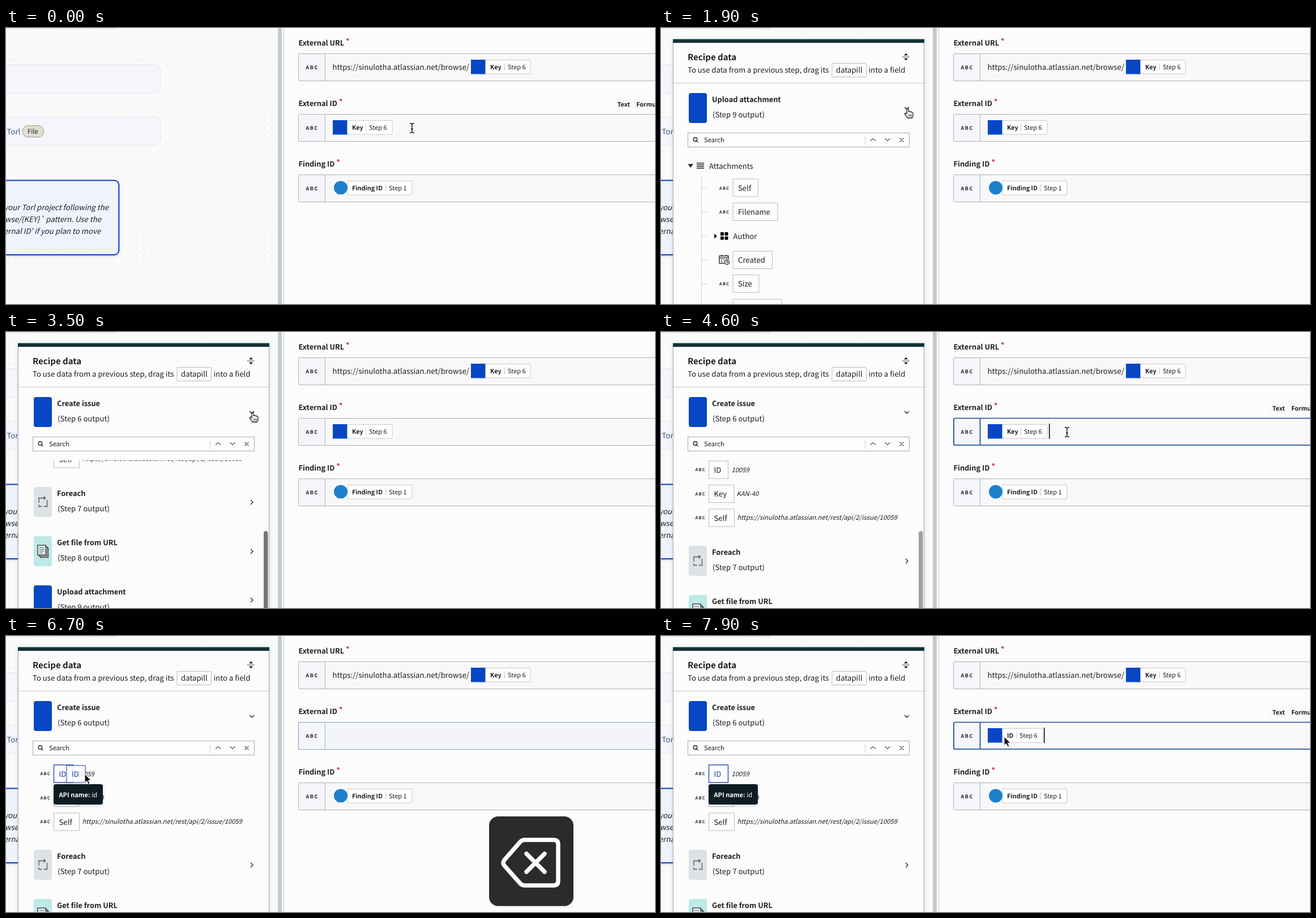
Recreate the animation shown at these times as an HTML page. Size 1146x488 px, loop 8000 ms.

```html
<!DOCTYPE html>
<html lang="en">
<head>
<meta charset="utf-8">
<title>Recipe data</title>
<style>
  html, body { margin: 0; width: 100%; height: 100%; overflow: hidden; background: #fcfcfc; }
  svg { display: block; width: 1146px; height: 488px; }
  text { font: 13.18px "Noto Sans CJK SC", "Noto Sans CJK JP", "Noto Sans", sans-serif; fill: #1e1e1e;
    text-rendering: geometricPrecision; white-space: pre; }
  .b { font-weight: 700; font-size: 12.8px; }
  .h { font-weight: 700; font-size: 15px; }
  .s { font-size: 10.95px; }
  .sb { font-weight: 700; font-size: 10.8px; }
  .m { font-size: 11.25px; }
  .mb { font-weight: 700; font-size: 11.1px; }
  .it { font-style: italic; font-size: 11.3px; }
  .note { font-style: italic; text-anchor: end; }
  .abc { font-weight: 700; font-size: 8.8px; letter-spacing: 1.7px; }
  .tiny { font-weight: 700; font-size: 7.4px; letter-spacing: 1.2px; }
  .line { fill: none; stroke: #2a2a2a; stroke-width: 1.4; }
  .thin { fill: none; stroke: #4a4f52; stroke-width: 1.1; }
  .box { fill: #fdfdfd; stroke: #b4bdc3; }
  .blue { fill: #1540b0; }
</style>
</head>
<body>
<svg id="stage" viewBox="0 0 1146 488" xmlns="http://www.w3.org/2000/svg"></svg>
<script>
const LOOP = 8000, FRAME = 100;
const BRAND = '#0747c4', RING = '#1c4a8c', DISC = '#1c7fcd';
const SITE = 'https://sinulotha.atlassian.net';

// Drawing helpers
const text = (x, y, s, cls = '') => `<text x="${x}" y="${y}" class="${cls}">${s}</text>`;
const rect = (x, y, w, h, attrs = '') => `<rect x="${x}" y="${y}" width="${w}" height="${h}" ${attrs}/>`;
const path = (d, attrs = 'class="line"') => `<path d="${d}" ${attrs}/>`;
const group = (id, body, attrs = '') => `<g id="${id}" ${attrs}>${body}</g>`;
const at = (x, y, body) => `<g transform="translate(${x} ${y})">${body}</g>`;

const chevron = (x, y, turn = 0, id = '') =>
  at(x, y, `<g transform="rotate(${turn})"><path ${id && `id="${id}"`} d="M-2 -4L2 0L-2 4" class="line"/></g>`);

const caret = (id, x) => rect(x, 162, 1.6, 27, `id="${id}" fill="#111"`);

function chip(x, y, name, bar, step, width, disc, edge = '#c3cbd1', ink = '#1e1e1e') {
  const mark = disc
    ? `<circle cx="14" cy="12.5" r="12" fill="${DISC}"/>`
    : rect(0, 0, 25.5, 25.5, `fill="${BRAND}"`);
  const frame = rect(disc ? 26 : 20, .5, width - (disc ? 26 : 20), 24.5, `rx="2" fill="#fff" stroke="${edge}"`);
  return at(x, y, frame + mark +
    `<g style="--ink:${ink}">` + text(34, 17, name, 'sb') +
    path(`M${bar} 6V19`, 'stroke="#bcc5cb"') + text(bar + 5.5, 17, step, 's') + '</g>');
}

const field = (y, label, star) =>
  text(516.5, y - 14, label, 'b') +
  `<text x="${star}" y="${y - 17.5}" class="b" style="fill:#c0352b">*</text>` +
  rect(516.5, y + .5, 640, 48, 'rx="2" fill="#f8f8f8"') +
  rect(516.5, y + .5, 47, 48, 'fill="#f4f6fb"') +
  rect(516.5, y + .5, 640, 48, 'rx="2" fill="none" stroke="#a5b2b9"') +
  path(`M563.5 ${y}v49`, 'stroke="#a5b2b9"') +
  text(529.5, y + 28, 'ABC', 'abc');

const dropZone = y => rect(564, y + 1, 600, 47.5, 'fill="#f3f5fa"') +
  rect(516.5, y + .5, 640, 48, 'rx="2" fill="none" stroke="#8fa3b5" stroke-width="1.2"');

const loopIcon =
  path('M58 240V231.5H69M66.500 228.500L69.500 231.500L66.500 234.500M72.500 235V246.500H67M63.500 246.500H58V243',
    'fill="none" stroke="#4a5458" stroke-width="1.300"');
const fileIcon = [4.5, 2.25, 0].map(d =>
  rect(56 + d, 315 + d, 14, 17, 'fill="#eafaf8" stroke="#222" stroke-width="1.200"')).join('') +
  path('M58.500 319.500H67.500M58.500 322.500H67.500M58.500 325.500H67.500M58.500 328.500H65', 'class="thin"');
const tile = (y, color) => rect(49, y, 32, 53, `rx="4" fill="${color}"`);

function item(y, name, step, color = BRAND) {
  return tile(y, color) + text(90, y + 16, name, 'b') + text(91, y + 42.5, `(Step ${step} output)`);
}

function pill(x, y, label, w, cls = '') {
  return rect(x + .5, y - 15.5, w, 31, 'class="box"') + text(x + 9.5, y + 5, label, cls);
}

const tinyAbc = (x, y) => text(x, y + 3, 'ABC', 'tiny');

const openHead = (name, step) =>
  rect(22, 98, 432, 129, 'fill="#fcfcfc"') + item(115, name, step) + chevron(434, 142, 90) +
  rect(47.5, 185.5, 391, 25, 'fill="#fdfdfd" stroke="#a0abb0"') +
  '<circle cx="60.500" cy="197" r="3.200" class="line"/>' + path('M63 199.500L65.500 202') +
  text(76, 202, 'Search', 'm') + path('M360.500 191V206', 'stroke="#cdd3d6"') +
  path('M370 199.500L374.500 195.500L379 199.500M395.500 195.500L400 199.500L404.500 195.500' +
    'M421.500 194.500L428.500 201.500M428.500 194.500L421.500 201.500', 'class="thin"');

const leaf = (y, label, w) => tinyAbc(103, y) + pill(126.5, y, label, w);

const canvas =
  rect(0, 0, 480, 488, 'fill="#fafafa"') + rect(0, 0, 480, 488, 'fill="url(#dots)"') +
  rect(-20, -20, 214, 20.5, 'rx="2" fill="#f4f6fb" stroke="#cfd5dd"') +
  [65.5, 158].map(y => rect(-20, y, 292.5, 49.5, 'rx="8" fill="#f4f6fb" stroke="#dee3ec"')).join('') +
  `<text x="1.500" y="188" style="fill:#3d4c8f">Torl</text>` +
  rect(29, 172.5, 37.5, 20.5, 'rx="10" fill="#dfe0d0" stroke="#989a83"') + text(38, 187, 'File', 'm') +
  rect(-20, 269.5, 219.3, 131.5, 'rx="8" fill="#eff3fc" stroke="#0b3cb6" stroke-width="2" filter="url(#soft)"') +
  text(181, 322, 'issue in your Torl project following the', 'note') +
  text(168, 343, '/browse/{KEY}` pattern. Use the', 'note') +
  text(167, 364, "'External ID' if you plan to move", 'note');

const form =
  rect(480, 0, 7, 488, 'fill="#c3cbcf"') + rect(487, 0, 660, 488, 'fill="#fcfcfc"') +
  path('M490.500 0V488', 'stroke="#c3cbcf"') +
  field(45, 'External URL', 600) + field(152, 'External ID', 588) + field(259, 'Finding ID', 583.5) +
  group('drop', dropZone(152)) + group('others', dropZone(45) + dropZone(259)) +
  text(576.5, 74, SITE + '/browse/') +
  chip(821, 56, 'Key', 59.5, 'Step 6', 105) +
  group('keyChip', chip(577, 163, 'Key', 58.5, 'Step 6', 105)) +
  group('idChip', chip(577, 163, 'ID', 50.5, 'Step 6', 97)) +
  chip(577, 270, 'Finding ID', 93.5, 'Step 1', 140, true) +
  group('modes', rect(1073, 126, 80, 18, 'fill="#f9f9f9"') + text(1079.5, 139, 'Text', 'sb') + text(1113, 139, 'Formula', 'sb')) +
  group('ring', rect(517, 152.5, 640, 47.5, 'rx="2" class="line"') + path('M563.500 152V200'), `style="--edge:${RING}"`) +
  caret('caretKey', 685) + caret('caretEmpty', 577) + caret('caretId', 676) +
  group('suggest',
    rect(578, 203, 580, 86, 'fill="#fdfdfd" filter="url(#soft)"') + path('M578 203.500H1146', 'stroke="#b9dbe8"') +
    rect(578, 242, 580, 46.5, 'fill="url(#sky)"') + rect(578, 245, 4, 39, 'fill="#1747bd"') +
    path('M578 241.500H1146M578 288.500H1146', 'stroke="#dbe6ee"') + text(590.5, 227, 'Suggested input', 'b') +
    rect(603.5, 251.5, 143.5, 25, 'rx="2" fill="#fff"') +
    chip(603, 251.5, 'External ID', 97.5, 'Step 4', 144, true, 'none', '#122f70') +
    rect(603.5, 252, 143.5, 24.5, `rx="2" fill="none" stroke="${RING}"`)) +
  group('press',
    rect(853, 319, 149, 158.5, 'rx="16" fill="#2b2b2b"') +
    path('M916 360.500H967Q975 360.500 975 368.500V433Q975 441 967 441H916Q911 441 908 437.500' +
      'L880 406Q876 401 880 396L908 364Q911 360.500 916 360.500ZM919 385L951 417M951 385L919 417',
      'fill="none" stroke="#fff" stroke-width="7.500" stroke-linecap="round" stroke-linejoin="round"'));

const rows =
  tinyAbc(60.5, 243) + pill(84, 243.5, 'ID', 34) + text(124.5, 247.5, '10059', 'it') +
  tinyAbc(60.5, 285.5) + pill(84, 286, 'Key', 44.5) + text(133.5, 290, 'KAN-40', 'it') +
  tinyAbc(60.5, 328) + pill(84, 328.5, 'Self', 45) +
  text(134.5, 332, SITE + '/rest/api/2/issue/10059', 'it');

const rest =
  item(212, 'Foreach', 7, '#dde2e4') + loopIcon + chevron(434, 239) +
  item(299, 'Get file from URL', 8, '#bde9e7') + fileIcon + chevron(434, 326) +
  item(386, 'Upload attachment', 9) + chevron(434, 412, 0, 'turning') +
  text(47, 488, 'Current step output', 'b');

const tree =
  openHead('Upload attachment', 9) +
  path('M47.500 240.500H57L52.250 247Z', 'fill="#222"') + path('M63 239H76M63 242H76M63 245H76M63 248H76') +
  text(85, 248.5, 'Attachments') +
  path('M71.500 262V488' + [283, 325, 368, 410, 452].map(y => `M71.500 ${y}.5H81`).join(''), 'fill="none" stroke="#cfd4d7"') +
  leaf(282.5, 'Self', 44.5) + leaf(325, 'Filename', 79) +
  path('M94 363.500L99 368L94 372.500Z', 'fill="#222"') +
  [105, 112.5].map(x => rect(x, 361, 6, 6, 'rx="1"') + rect(x, 368.5, 6, 6, 'rx="1"')).join('') +
  text(127.5, 373, 'Author') +
  path('M112 416H103V403H119V409M103 406.500H119M107 401V404M115 401V404M106 410H108M110 410H112M106 413H108') +
  '<circle cx="116.500" cy="414" r="4" class="line"/>' + path('M116.500 411.500V414.500H118.500') +
  pill(126.5, 410, 'Created', 69.5) + leaf(452, 'Size', 46) + rect(127, 479.5, 86, 31, 'class="box"');

const panel =
  rect(21.5, 20.5, 443, 480, 'fill="#fcfcfc" stroke="#a3aeb3" filter="url(#soft)"') +
  group('rows', rows) + group('rest', rest) +
  group('first', item(125, 'Create issue', 6) + chevron(434, 152)) +
  group('tree', tree) + group('open', openHead('Create issue', 6)) +
  rect(22, 26, 442, 72, 'fill="#fcfcfc"') + rect(21, 19.7, 444, 6.6, 'fill="#15303a"') +
  path('M22 97.500H464', 'stroke="#c6cdd1"') +
  text(47, 56.5, 'Recipe data', 'h') + text(47, 79, 'To use data from a previous step, drag its') +
  rect(302, 62.5, 60.5, 24, 'rx="1" class="box"') + text(309, 79, 'datapill') + text(366.5, 79, 'into a field') +
  path('M426.500 51H438.500', 'class="line" stroke-dasharray="1.800 1.500"') +
  path('M429 48.500L432.500 44.500L436 48.500ZM429 53.500L432.500 57.500L436 53.500Z', 'fill="#222"') +
  rect(455, 352, 7.5, 160, 'id="thumb" rx="3.700" fill="#777"') +
  group('picked', rect(84.5, 228, 34, 31, 'fill="#fdfdfd" stroke="#1540b0" stroke-width="1.300"') + text(93.5, 248.5, 'ID', 'blue')) +
  group('tip', rect(84, 262, 87, 36, 'rx="4" fill="#071a20" filter="url(#soft)"') +
    '<text x="93.500" y="284.500" class="m" style="fill:#fff"><tspan class="mb">API name:</tspan> id</text>');

const mouse =
  group('drag', rect(-32, -15, 33, 30, 'fill="#fff" fill-opacity=".85" stroke="#1540b0" filter="url(#soft)"') + text(-23, 5, 'ID', 'blue')) +
  group('beam', ['#fff', '#111'].map((c, i) => path('M-4 -8.500Q0 -8.500 0 -5.500Q0 -8.500 4 -8.500M0 -6V6M-4 8.500Q0 8.500 0 5.500Q0 8.500 4 8.500M-2 1.500H2',
    `fill="none" stroke="${c}" stroke-width="${i ? 1.4 : 3}"`)).join('')) +
  group('arrow', path('M0 0V15.500L3.600 12.200L6.200 18L8.900 16.800L6.400 11.200H11.200Z', 'fill="#111" stroke="#fff"')) +
  group('hand', path('M-1.500 .5Q0 -1 1.500 .5V6Q3 4.800 4.200 6.300Q5.700 5.300 7 7Q8.800 6.500 9.500 8.500V12Q9.500 14 8 17H-.5' +
    'Q-2 13.500 -5 10.500Q-5.500 8 -3 8.500L-1.500 10Z', 'fill="#fff" stroke="#111" stroke-width="1.300" stroke-linejoin="round"') +
    path('M2 11V14.500M4.300 11V14.500M6.600 11V14.500', 'stroke="#111"'));

document.getElementById('stage').innerHTML = `
  <style>
    g[style*="--ink"] text { fill: var(--ink); }
    #ring * { stroke: var(--edge); stroke-width: 1.700; }
    text.blue { fill: #1540b0; }
  </style>
  <defs>
    <pattern id="dots" width="13.300" height="13.300" patternUnits="userSpaceOnUse"><circle cx="4" cy="3.500" r=".8" fill="#d5d9de"/></pattern>
    <linearGradient id="sky"><stop stop-color="#dfe6fa"/><stop offset=".3" stop-color="#e9edfb"/><stop offset="1" stop-color="#d8effa"/></linearGradient>
    <filter id="soft" x="-20%" y="-20%" width="140%" height="150%"><feDropShadow dx="0" dy="2" stdDeviation="2.500" flood-color="#203040" flood-opacity=".16"/></filter>
  </defs>` + canvas + form + group('panel', panel) + group('mouse', mouse);

// Motion helpers: every change is a hard step on a shared loop
function play(id, prop, rows) {
  const keys = rows.map(([t, v]) => ({ offset: t / LOOP, [prop]: v, easing: 'step-end' }));
  keys.push({ offset: 1, [prop]: rows[rows.length - 1][1] });
  document.getElementById(id).animate(keys, { duration: LOOP, iterations: Infinity });
}
const fade = (id, rows) => play(id, 'opacity', rows[0][0] ? [[0, 0], ...rows] : rows);
const show = (id, ...spans) => fade(id, spans.flatMap(([a, b]) => b ? [[a, 1], [b, 0]] : [[a, 1]]));
const slide = (id, rows) => play(id, 'transform', rows.map(([t, x, y]) => [t, `translate(${x}px, ${y}px)`]));

function glide(id, x, y, legs) {
  const rows = [[0, x, y]];
  for (const [start, count, tx, ty] of legs) {
    for (let k = 1; k <= count; k++) {
      const p = k / count, e = p * p * (3 - 2 * p);
      rows.push([start + (k - 1) * FRAME, x + (tx - x) * e, y + (ty - y) * e]);
    }
    [x, y] = [tx, ty];
  }
  slide(id, rows);
}

glide('mouse', 717, 177, [
  [1100, 6, 441, 144], [1900, 1, 435.5, 142], [3900, 6, 717, 177],
  [5800, 9, 116, 244], [6700, 1, 139, 244], [6800, 8, 606, 178]
]);
show('beam', [0, 1400], [4100, 5200], [5800, 6000]);
show('arrow', [1400, 1900], [3900, 4100], [6000]);
show('hand', [1900, 3900]);
show('drag', [6700, 7600]);

fade('panel', [[400, .35], [500, .8], [600, 1]]);
show('tree', [400, 2600]);
show('rest', [2600]);
show('first', [2600, 3300]);
show('open', [3300]);
show('rows', [3300]);
const unfold = [[0, 0], [3300, 6], [3400, 24], [3500, 62], [3600, 130], [3700, 166]];
slide('rest', unfold.map(([t, y]) => [t, 0, y]));
slide('rows', unfold.map(([t, y]) => [t, 0, y - 166]));
play('turning', 'transform', [[0, 'rotate(45deg)'], [2700, 'rotate(0deg)']]);
fade('thumb', [[3400, 1], [4600, .7], [4700, .4], [4800, .15], [4900, 0]]);
show('picked', [6400]);
show('tip', [6500]);

show('ring', [400, 1900], [4600, 6500], [7700]);
show('modes', [0, 1900], [4100, 6500], [7700]);
show('caretKey', [400, 900], [1400, 1900], [4600, 5300]);
show('caretEmpty', [5300, 5800], [6300, 6500]);
show('caretId', [7700]);
show('keyChip', [0, 5300]);
show('idChip', [7600]);
fade('suggest', [[5300, .6], [5400, 1], [6500, 0]]);
fade('press', [[5200, .5], [5300, 1], [7000, .5], [7100, 0]]);
show('drop', [6500, 7700]);
show('others', [6800, 7600]);
</script>
</body>
</html>
```
